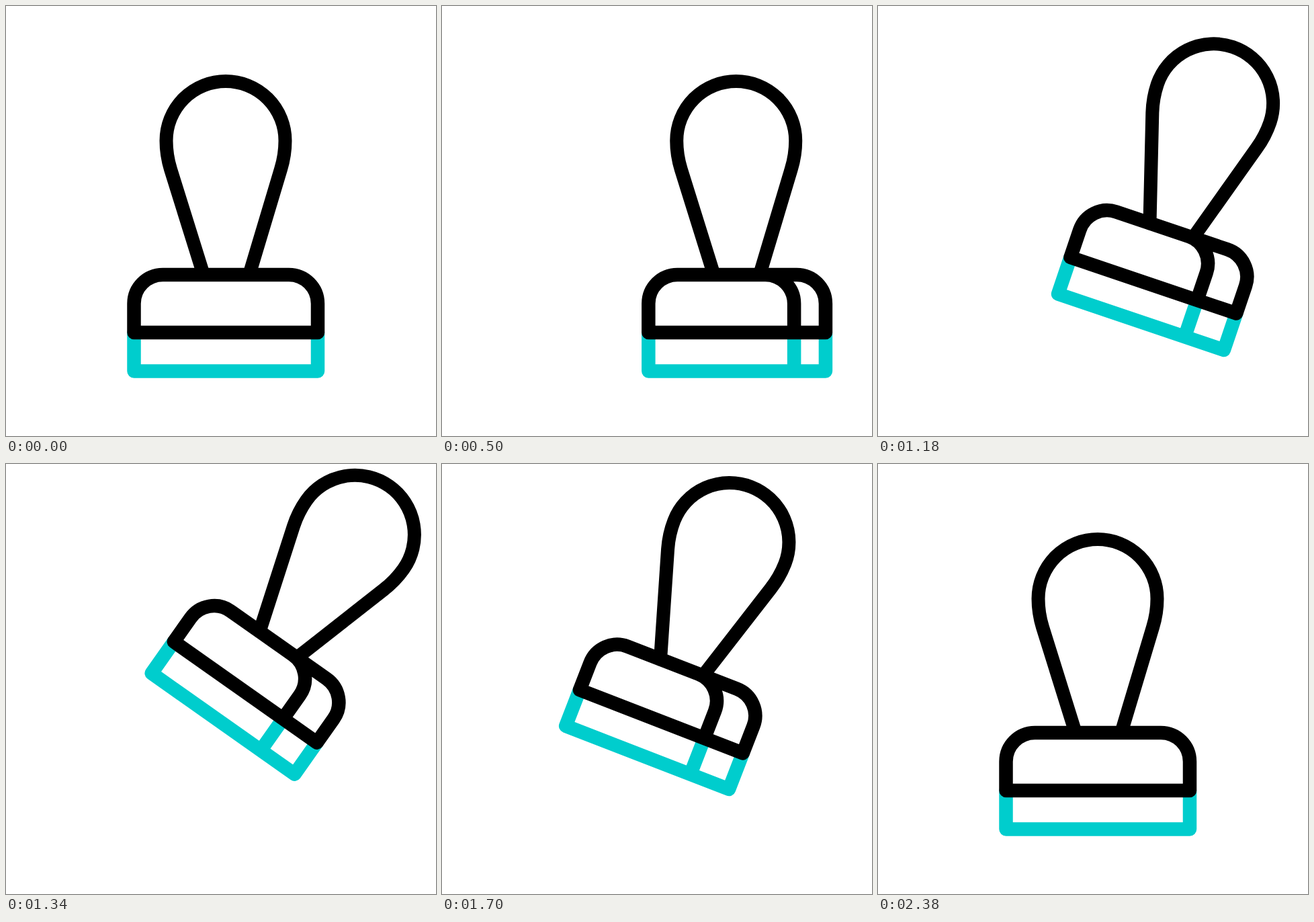
Animation, 640 px wide and 640 px high, one loop 2.62 s. Source, as an HTML page:

```html
<!DOCTYPE html>
<html lang="en">
<head>
<meta charset="utf-8">
<title>Stamp</title>
<style>
  html, body { margin: 0; width: 100%; height: 100%; overflow: hidden; background: #fff; }
  svg { display: block; width: 100%; height: 100%; }
  path { fill: none; stroke-width: 20.5; stroke-linecap: round; stroke-linejoin: round; }
  .ink { stroke: #000; }
  .pad { stroke: #00cdcd; }
  #handle { stroke-width: 20; }
</style>
</head>
<body>
<svg viewBox="0 0 640 640">
  <g id="stamp">
    <path id="pad" class="pad"/>
    <path id="handle" class="ink" d="M294 400 L245 243 C241 230 238.5 215 238.5 200.5 A88.5 88.5 0 0 1 415.5 200.5 C415.5 215 413 230 409 243 L362 400"/>
    <path id="body" class="ink"/>
  </g>
  <path id="sparks" class="pad" d="M110.5 476 L128.5 493.5 M560 476 L542 493.5"/>
</svg>
<script>
const LOOP = 2620;
const TILT = 35.2;
const HOME = [320, 320];
const SIDE = [460.5, 320];
const RAISED = [440.7, 196];
const BEND = [340.5, 212.5];
const RIGHT = 464, TOP = 400, MID = 486, BOTTOM = 543.5, RADIUS = 43;

const $ = id => document.getElementById(id);
const stamp = $('stamp'), pad = $('pad'), handle = $('handle'), body = $('body'), sparks = $('sparks');

const progress = (t, from, to) => Math.min(1, Math.max(0, (t - from) / (to - from)));
const easeInOut = u => u < 0.5 ? 2 * u * u : 1 - 2 * (1 - u) ** 2;
const eased = (t, from, to) => easeInOut(progress(t, from, to));
const mix = (a, b, p) => a.map((v, i) => v + (b[i] - v) * p);
const curve = (a, b, c, p) => mix(mix(a, b, p), mix(b, c, p), p);

function drawBox(depth) {
  const left = 190.5 + 13 * depth;
  const front = RIGHT - 61.5 * depth;
  const corner = x => `H${x - RADIUS} A${RADIUS} ${RADIUS} 0 0 1 ${x} ${TOP + RADIUS} V${MID}`;
  const start = `M${left + RADIUS} ${TOP}`;
  body.setAttribute('d',
    `M${left} ${MID} V${TOP + RADIUS} A${RADIUS} ${RADIUS} 0 0 1 ${left + RADIUS} ${TOP} ` +
    `${corner(RIGHT)} H${left} Z ${start} ${corner(front)}`);
  pad.setAttribute('d',
    `M${left} ${MID} V${BOTTOM} H${RIGHT} V${MID} M${front} ${MID} V${BOTTOM}`);
  handle.setAttribute('transform', `translate(${5 * depth} 0)`);
}

function pose(t) {
  if (t < 1016) return { at: mix(HOME, SIDE, eased(t, 200, 660)), angle: 0 };
  if (t < 1444) {
    const lift = eased(t, 1016, 1336);
    return { at: mix(SIDE, RAISED, lift), angle: TILT * lift };
  }
  const drop = eased(t, 1444, 2020);
  return { at: curve(RAISED, BEND, HOME, drop), angle: TILT * (1 - drop) };
}

function render(t) {
  const { at, angle } = pose(t);
  drawBox(eased(t, 200, 660) - eased(t, 2100, 2380));
  stamp.setAttribute('transform',
    `translate(${at[0]} ${at[1]}) rotate(${angle}) translate(${-HOME[0]} ${-HOME[1]})`);
  sparks.setAttribute('opacity', progress(t, 1960, 2035) - progress(t, 2035, 2100));
}

function tick() {
  render(performance.now() % LOOP);
  requestAnimationFrame(tick);
}
tick();
</script>
</body>
</html>
```
